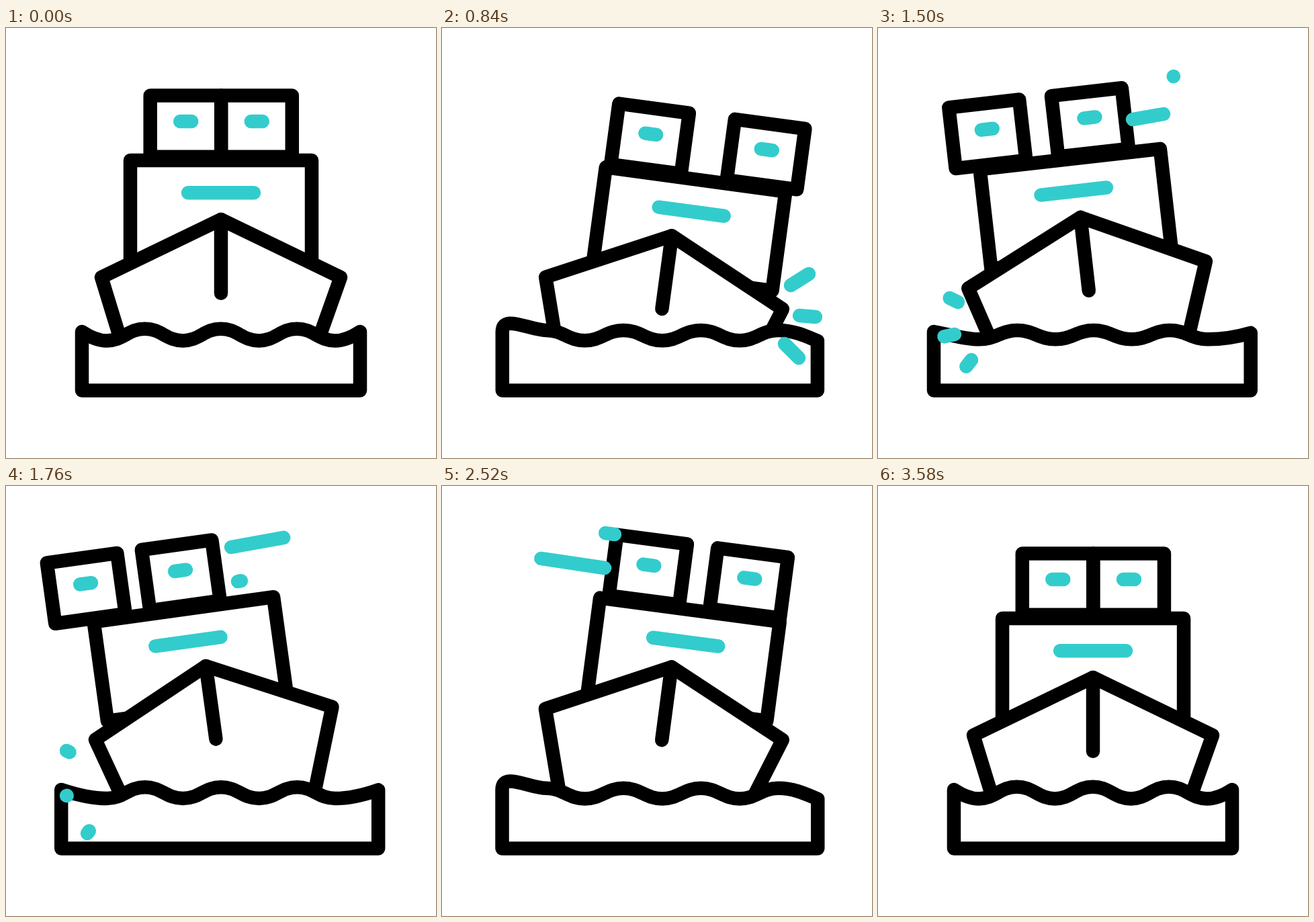
Animation, 640 px wide and 640 px high, one loop 3600 ms. Source, as an HTML page with a canvas:

```html
<!DOCTYPE html>
<html lang="en">
<head>
<meta charset="utf-8">
<title>Ship in waves</title>
<style>
  html, body { margin: 0; width: 100%; height: 100%; overflow: hidden; background: #fff; }
  canvas { display: block; width: 640px; height: 640px; }
</style>
</head>
<body>
<canvas id="stage" width="640" height="640"></canvas>
<script>
const ctx = document.getElementById('stage').getContext('2d');
const LOOP = 3600, INK = '#000', TEAL = '#33cccc', PIVOT = { x: 320, y: 450 };

const clamp = v => Math.max(0, Math.min(1, v));
const ease = u => u * u * (3 - 2 * u);
const mix = (a, b, k) => a + (b - a) * k;

// Finds the eased position between the key times around t.
function locate(times, t) {
  let i = 0;
  while (i < times.length - 2 && t >= times[i + 1]) i++;
  return [i, ease(clamp((t - times[i]) / (times[i + 1] - times[i])))];
}

function track(times, values, t) {
  const [i, k] = locate(times, t);
  return mix(values[i], values[i + 1], k);
}

// Key times and values of the ship
const TILT = [[0, 860, 1670, 2580, 3600], [0, 7.7, -8.3, 7.7, 0]];
const HEAVE = [[0, 880, 2010, 3400, 3600], [0, 23, -24.5, 0, 0]];
const SLIDE = [0, 920, 1930, 2730, 3600];
const CABIN = [0, 24.5, -25, 24.5, 0];
const LEFT_BOX = [0, 1, -117, 23, 0];
const RIGHT_BOX = [0, 71, -83, 71, 0];

// Water outline poses
const CALM = { left: 113, right: 527, x: 150, step: 56.6, even: 465.5, odd: 447.7, endY: 452,
  l1x: 125, l1y: 460, l2x: 137, r1x: 503, r2x: 515, r2y: 460 };
const WIDE = { ...CALM, left: 82, right: 554, l1x: 104, l2x: 128, r1x: 512, r2x: 532 };
const SURGE = { left: 89.5, right: 559.3, x: 155, step: 57.6, even: 449.7, odd: 465.5, endY: 466,
  l1x: 89.5, l1y: 425, l2x: 130, r1x: 525, r2x: 545, r2y: 460 };
const WATER_TIMES = [0, 900, 1680, 2500, 3600];
const WATER = [CALM, SURGE, WIDE, SURGE, CALM];

// Teal strokes: start time, then the first and last point of travel
const STROKES = [
  [1494, 440, 72, 335, 91], [1390, 425, 128, 345, 142],
  [2171, 172, 60, 257, 72], [2276, 134, 106, 242, 122],
  [1410, 119, 408, 90, 394], [1380, 114, 456, 90, 461], [1410, 139, 494, 121, 517]
];
for (const start of [640, 2587]) {
  STROKES.push([start, 519, 383, 546, 366], [start, 532, 428, 556, 430], [start, 510, 470, 531, 491]);
}

function shape(points, { close = true } = {}) {
  ctx.beginPath();
  points.forEach(([x, y]) => ctx.lineTo(x, y));
  if (close) ctx.closePath();
  ctx.fill();
  ctx.strokeStyle = INK;
  ctx.stroke();
}

function dash(x1, y1, x2, y2, color = TEAL) {
  ctx.beginPath();
  ctx.moveTo(x1, y1);
  ctx.lineTo(x2, y2);
  ctx.strokeStyle = color;
  ctx.stroke();
}

const frame = (l, t, r, b) => shape([[l, t], [r, t], [r, b], [l, b]]);

function shifted(values, t, draw) {
  ctx.save();
  ctx.translate(track(SLIDE, values, t), 0);
  draw();
  ctx.restore();
}

function box(x) {
  frame(x, 100.5, x + 105.5, 191.7);
  dash(x + 44.5, 139, x + 61.5, 139);
}

function ship(t) {
  ctx.save();
  ctx.translate(PIVOT.x, PIVOT.y + track(...HEAVE, t));
  ctx.rotate(track(...TILT, t) * Math.PI / 180);
  ctx.translate(-PIVOT.x, -PIVOT.y);
  shifted(LEFT_BOX, t, () => box(214.7));
  shifted(RIGHT_BOX, t, () => box(320.3));
  shifted(CABIN, t, () => {
    frame(185, 197, 455, 346);
    dash(271, 245.3, 369, 245.3);
  });
  shape([[180, 495], [142, 371], [320, 285], [498, 371], [454, 495]], { close: false });
  dash(320, 285, 320, 394.7, INK);
  ctx.restore();
}

function water(t) {
  const [i, k] = locate(WATER_TIMES, t);
  const w = {};
  for (const key in CALM) w[key] = mix(WATER[i][key], WATER[i + 1][key], k);
  ctx.beginPath();
  ctx.moveTo(w.left, 539.5);
  ctx.lineTo(w.left, 452);
  ctx.bezierCurveTo(w.l1x, w.l1y, w.l2x, w.even, w.x, w.even);
  const bend = w.step * 0.43;
  for (let n = 1; n <= 6; n++) {
    const x = w.x + n * w.step;
    const from = n % 2 ? w.even : w.odd, to = n % 2 ? w.odd : w.even;
    ctx.bezierCurveTo(x - w.step + bend, from, x - bend, to, x, to);
  }
  ctx.bezierCurveTo(w.r1x, w.even, w.r2x, w.r2y, w.right, w.endY);
  ctx.lineTo(w.right, 539.5);
  ctx.closePath();
  ctx.fill();
  ctx.strokeStyle = INK;
  ctx.stroke();
}

// The head runs out first, then the tail catches up with it.
function stroke(t, [start, x1, y1, x2, y2]) {
  const age = (t - start) / 200;
  if (age <= 0 || age >= 2) return;
  const head = ease(clamp(age)), tail = ease(clamp(age - 1));
  dash(mix(x1, x2, tail), mix(y1, y2, tail), mix(x1, x2, head), mix(y1, y2, head));
}

function render(now) {
  const t = now % LOOP;
  ctx.fillStyle = '#fff';
  ctx.fillRect(0, 0, 640, 640);
  ctx.lineWidth = 20.5;
  ctx.lineCap = ctx.lineJoin = 'round';
  ship(t);
  water(t);
  STROKES.forEach(s => stroke(t, s));
}

let origin = null;
function tick(now) {
  if (origin === null) origin = now;
  render(now - origin);
  requestAnimationFrame(tick);
}
render(0);
requestAnimationFrame(tick);
</script>
</body>
</html>
```
